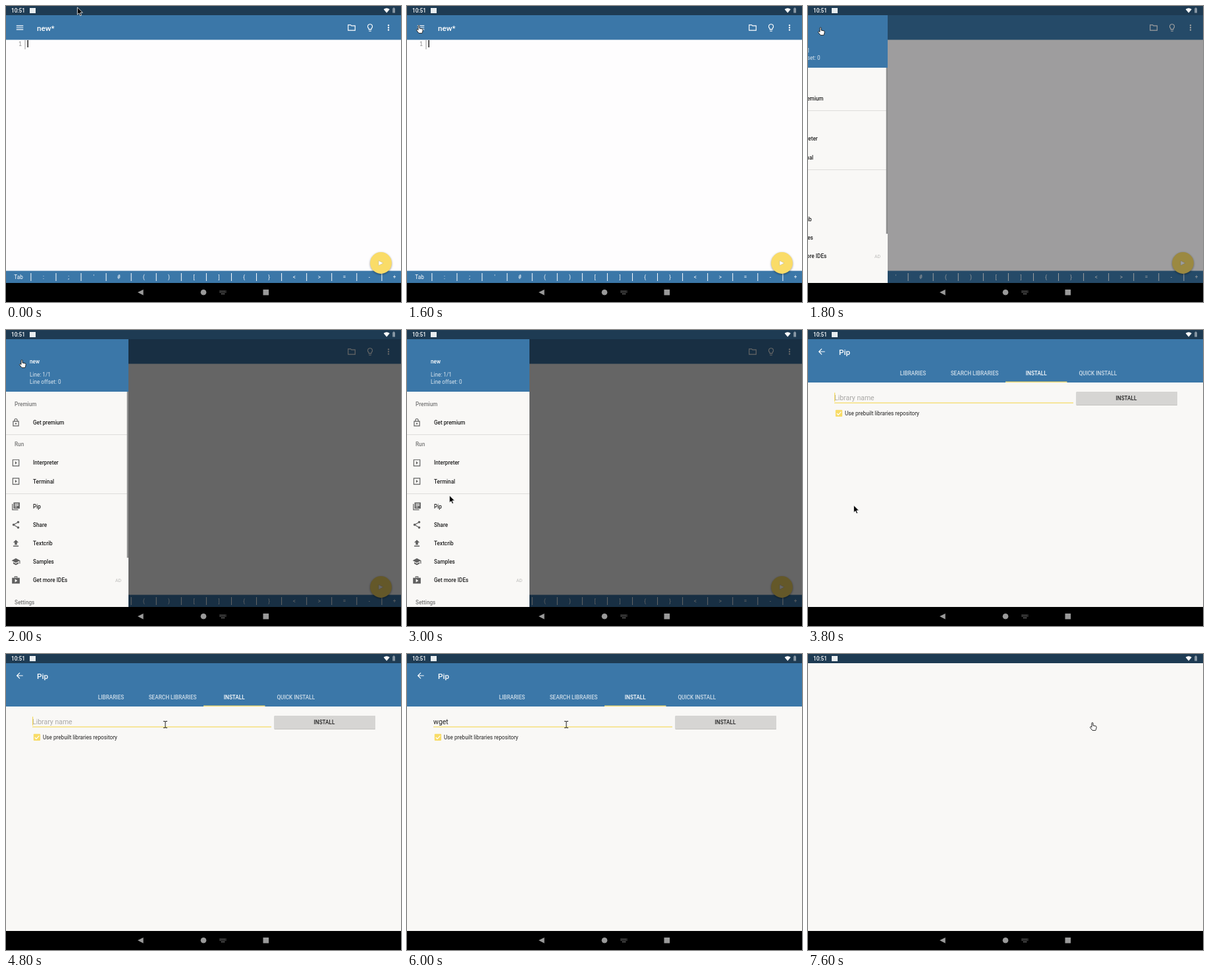
Animation, 600 px wide and 451 px high, one loop 8000 ms. Source, as an HTML page:

```html
<!DOCTYPE html>
<html lang="en">
<head>
<meta charset="utf-8">
<title>Installing a library</title>
<style>
  html, body { margin: 0; width: 100%; height: 100%; overflow: hidden; background: #f9f8f6; }
  svg.stage { display: block; width: 100vw; height: 100vh; }
  text { font: 400 8.2px Roboto, sans-serif; white-space: pre; }
  .medium { font-weight: 500; }
  .title { font-size: 11.7px; font-weight: 500; fill: #fff; }
  .field { font-size: 10.5px; }
  .middle { text-anchor: middle; }
  .line { fill: none; stroke: currentColor; stroke-width: 2; }
  .solid { fill: currentColor; }

  .anim { animation: 8s step-end infinite; }
  #editor { animation-name: editor; }
  #editorCaret { animation-name: editorCaret; }
  #scrim { animation-name: scrim; }
  #drawer { animation-name: drawer; }
  #press, #scrollbar { animation-name: press; }
  #scrollbar { animation-name: scrollbar; }
  #pip { animation-name: pip; }
  #hint { animation-name: hint; }
  #typed { animation-name: typed; }
  #fieldCaret { animation-name: fieldCaret; }
  #keyboard { animation-name: keyboard; }
  #pointer { animation-name: pointer; }
  #arrow { animation-name: arrow; }
  #hand { animation-name: hand; }
  #beam { animation-name: beam; }

  @keyframes editor { 0% { opacity: 1 } 47.5% { opacity: 0 } }
  @keyframes editorCaret {
    0% { opacity: 1 } 2.5% { opacity: 0 } 7.5% { opacity: 1 }
    15% { opacity: 0 } 20% { opacity: 1 } 27.5% { opacity: 0 }
  }
  @keyframes scrim { 0% { opacity: 0 } 22.5% { opacity: .38 } 25% { opacity: .6 } }
  @keyframes drawer {
    0% { transform: translateX(-187px) } 22.5% { transform: translateX(-65px) }
    25% { transform: none } 45% { transform: translateX(-31px) }
  }
  @keyframes press { 0% { opacity: 0 } 42.5% { opacity: 1 } }
  @keyframes scrollbar { 0% { opacity: 1 } 35% { opacity: 0 } }
  @keyframes pip { 0% { opacity: 0 } 47.5% { opacity: 1 } 90% { opacity: 0 } }
  @keyframes hint { 0% { opacity: 1 } 62.5% { opacity: 0 } }
  @keyframes typed {
    0% { clip-path: inset(0 100% 0 0) } 62.5% { clip-path: inset(0 65% 0 0) }
    65% { clip-path: inset(0 40% 0 0) } 67.5% { clip-path: none }
  }
  @keyframes fieldCaret {
    0% { transform: none; opacity: 1 }
    52.5% { transform: none; opacity: 0 }
    60% { transform: none; opacity: 1 }
    62.5% { transform: translateX(8px); opacity: 1 }
    65% { transform: translateX(14px); opacity: 1 }
    67.5% { transform: translateX(23px); opacity: 1 }
    72.5% { transform: translateX(23px); opacity: 0 }
    80% { transform: translateX(23px); opacity: 1 }
    85% { transform: translateX(23px); opacity: 0 }
  }
  @keyframes keyboard { 0% { opacity: 1 } 45% { opacity: 0 } 47.5% { opacity: 1 } }
  @keyframes pointer {
    0% { transform: translate(108px, 2px) }
    2.5% { transform: translate(104px, 4px) }
    5% { transform: translate(88px, 12px) }
    7.5% { transform: translate(66px, 21px) }
    10% { transform: translate(44px, 27px) }
    12.5% { transform: translate(24px, 29px) }
    15% { transform: translate(14px, 29px) }
    22.5% { transform: translate(15px, 32px) }
    25% { transform: translate(20px, 45px) }
    27.5% { transform: translate(25px, 72px) }
    30% { transform: translate(33px, 118px) }
    32.5% { transform: translate(43px, 170px) }
    35% { transform: translate(54px, 217px) }
    37.5% { transform: translate(64px, 252px) }
    40% { transform: translate(69px, 267px) }
    50% { transform: translate(84px, 247px) }
    52.5% { transform: translate(130px, 200px) }
    55% { transform: translate(190px, 145px) }
    57.5% { transform: translate(232px, 105px) }
    60% { transform: translate(239px, 102px) }
    77.5% { transform: translate(285px, 102px) }
    80% { transform: translate(355px, 102px) }
    82.5% { transform: translate(414px, 103px) }
    85% { transform: translate(428px, 104px) }
  }
  @keyframes arrow { 0% { opacity: 1 } 12.5% { opacity: 0 } 27.5% { opacity: 1 } 57.5% { opacity: 0 } }
  @keyframes hand { 0% { opacity: 0 } 12.5% { opacity: 1 } 27.5% { opacity: 0 } 82.5% { opacity: 1 } }
  @keyframes beam { 0% { opacity: 0 } 57.5% { opacity: 1 } 82.5% { opacity: 0 } }
</style>
</head>
<body>
<svg class="stage" viewBox="0 0 600 451" preserveAspectRatio="none">
  <defs>
    <g id="menu" class="line"><path d="M3 7h18M3 12h18M3 17h18"/></g>
    <g id="back" class="line"><path d="M20 12H5M12 4.5 4.5 12l7.5 7.5"/></g>
    <g id="folder" class="line"><path d="M3 5h6.5l2 2H21v12H3z"/></g>
    <g id="bulb" class="line"><path d="M9 17v-2.8a6 6 0 1 1 6 0V17zM9 21h6"/></g>
    <g id="more" class="solid"><circle cx="12" cy="6" r="2"/><circle cx="12" cy="12" r="2"/><circle cx="12" cy="18" r="2"/></g>
    <g id="lock"><path class="line" d="M5 9h14v12H5zM8.5 9V6a3.5 3.5 0 0 1 7 0v3"/><circle class="solid" cx="12" cy="15" r="2"/></g>
    <g id="run"><path class="line" d="M4 4h16v16H4z"/><path class="solid" d="M10 8v8l5-4z"/></g>
    <g id="books"><path class="line" d="M3 6v15h15"/><path class="solid" d="M6 2h16v16H6z"/><path d="M9 6h10M9 10h10M9 14h6" stroke="#f9f8f6" stroke-width="2"/></g>
    <g id="share"><path class="line" d="M18 5 6 12l12 7"/><g class="solid"><circle cx="18" cy="5" r="3"/><circle cx="6" cy="12" r="3"/><circle cx="18" cy="19" r="3"/></g></g>
    <g id="upload" class="solid"><path d="M5 18h14v2.5H5zM9 16h6v-6h4l-7-7-7 7h4z"/></g>
    <g id="school" class="solid"><path d="M12 3 1 9l11 6 9-5v7h2V9zM5 13.2v4l7 3.8 7-3.8v-4L12 17z"/></g>
    <g id="shop"><path class="line" d="M9 6V3h6v3"/><path class="solid" d="M2 6h20v15H2z"/><path fill="#f9f8f6" d="M9.5 9v9l6.5-4.5z"/></g>
  </defs>

  <rect width="600" height="451" fill="#f9f8f6"/>

  <g id="editor" class="anim">
    <rect y="14" width="600" height="408" fill="#fefdfe"/>
    <rect y="14" width="600" height="37.5" fill="#3b77a8"/>
    <text class="title" x="47" y="37.5">new*</text>
    <g id="toolbar" color="#fff"></g>
    <text x="24.5" y="61" text-anchor="end" fill="#888" style="font:9.4px 'Noto Sans Mono',monospace">1</text>
    <path d="M29 52v14" stroke="#999"/>
    <rect id="editorCaret" class="anim" x="32.5" y="52" width="1.3" height="11"/>
    <rect y="403.5" width="600" height="18.5" fill="#3b77a8"/>
    <g id="keys" fill="#fff"></g>
    <circle cx="569.5" cy="391.5" r="16.4" fill="#fadc68" style="filter:drop-shadow(0 1.5px 1.8px #0006)"/>
    <path d="M566 388v7.4l7-3.7z" fill="#fff" stroke="#b9b08a" stroke-width=".5"/>
    <rect id="scrim" class="anim" y="14" width="600" height="408"/>

    <g id="drawer" class="anim">
      <rect y="14" width="186" height="408" fill="#f9f8f6"/>
      <rect y="14" width="186" height="80" fill="#3b77a8"/>
      <text class="medium" x="36" y="50.5" fill="#fff">new</text>
      <g fill="#d9e5ee"><text x="36" y="71">Line: 1/1</text><text x="36" y="82">Line offset: 0</text></g>
      <path d="M0 159.5h186M0 249.5h186" stroke="#dddcda"/>
      <rect id="press" class="anim" x="5" y="254.5" width="176" height="28" rx="2" fill="#d2d1ce"/>
      <g class="medium" id="items" color="#606060" fill="#222"></g>
      <g id="sections" fill="#777"></g>
      <text x="166" y="383.7" fill="#bdbcba" style="font-size:7px">AD</text>
      <rect id="scrollbar" class="anim" x="183.7" y="94" width="2.3" height="253" fill="#8c8c8c"/>
    </g>
  </g>

  <g id="pip" class="anim">
    <rect y="14" width="600" height="408" fill="#f9f8f6"/>
    <rect y="14" width="600" height="66" fill="#3b77a8"/>
    <g id="pipBack" color="#fff"></g>
    <text class="title" x="47" y="37.5">Pip</text>
    <g id="tabs" fill="#fff"></g>
    <rect x="300" y="78.5" width="93.5" height="1.5" fill="#f6e07c"/>
    <text id="hint" class="field anim" x="40" y="107" fill="#a9a8a6">Library name</text>
    <text id="typed" class="field anim" x="40" y="107" fill="#222">wget</text>
    <rect id="fieldCaret" class="anim" x="40" y="95.5" width="1.2" height="13.5" fill="#f5d95c"/>
    <rect x="40" y="110.4" width="363" height="1.3" fill="#f6dd6a"/>
    <rect x="407.5" y="94.5" width="153.5" height="20.5" rx="1" fill="#bebdbb"/>
    <rect x="407.5" y="94" width="153.5" height="20.3" rx="1" fill="#d6d5d3"/>
    <text class="medium middle" x="483.5" y="107" fill="#222">INSTALL</text>
    <rect x="41.8" y="121.8" width="10.3" height="10.3" rx="1" fill="#f8dc68"/>
    <path d="m43.8 127 2.2 2.3 4.4-4.6" fill="none" stroke="#fff" stroke-width="1.2"/>
    <text x="56" y="130" fill="#222">Use prebuilt libraries repository</text>
  </g>

  <rect width="600" height="14" fill="#1e3b53"/>
  <text class="medium" x="8" y="10" fill="#fff">10:51</text>
  <rect x="36" y="3" width="9" height="8" fill="#e8edf0"/>
  <path d="M578.2 10.5 573.6 5q4.6-3.6 9.2 0z" fill="#fff"/>
  <path d="M587.2 3.4h1V2.6h1.8v.8h1v7.2h-3.8z" fill="#8797a4"/>

  <rect y="422" width="600" height="29"/>
  <g fill="#9a9a9a">
    <path d="M200 436.3l8.6-4.4v8.8z"/>
    <circle cx="300" cy="436.3" r="4.3"/>
    <rect x="390.5" y="432" width="8.6" height="8.6"/>
    <path id="keyboard" class="anim" d="M324.5 434.3h10M324.5 436.3h10M327 438.6h5" stroke="#9a9a9a" stroke-width="1.1" stroke-dasharray="1.2 .7"/>
  </g>

  <g id="pointer" class="anim">
    <path id="arrow" class="anim" d="M.4 0v11.2L3 8.8l1.7 4 1.9-.8-1.7-3.9h3.6z" stroke="#fff" stroke-width=".8"/>
    <path id="hand" class="anim" d="M3 7.6V1.6a1 1 0 0 1 2 0V5l4 .8q1.4.4 1.2 1.8l-.6 2.9-.8 1.9H4L1 8.7Q0 7 1.2 6.6 2 6.5 3 7.6z" fill="#fff" stroke="#111" stroke-width=".9"/>
    <path id="beam" class="anim" d="M0 .5h2q1 0 1 1v8q0 1-1 1H0M6 .5H4q-1 0-1 1m0 8q0 1 1 1h2" fill="none" stroke="#222"/>
  </g>
</svg>
<script>
  const add = (id, markup) => document.getElementById(id).insertAdjacentHTML('beforeend', markup);
  // Icons are drawn on a 24-unit grid and centred on (x, y).
  const icon = (name, x, y) =>
    `<use href="#${name}" transform="translate(${x} ${y}) scale(.586) translate(-12 -12)"/>`;
  const label = (text, x, y, attrs = '') => `<text x="${x}" y="${y}" ${attrs}>${text}</text>`;

  add('toolbar', icon('menu', 21, 33) + icon('folder', 525, 33) + icon('bulb', 553, 33) + icon('more', 581, 33));
  add('pipBack', icon('back', 21, 33));

  ['Tab', ':', ';', "'", '#', '(', ')', '[', ']', '{', '}', '&lt;', '&gt;', '=', '-', '+'].forEach((key, i) => {
    const x = 19 + i * 38.07;
    add('keys', label(key, x, 415.6, 'class="middle"') +
      `<rect x="${x + 18.4}" y="407" width="1" height="12"/>`);
  });

  [['lock', 'Get premium', 140.8], ['run', 'Interpreter', 202.4], ['run', 'Terminal', 230.5],
   ['books', 'Pip', 268.6], ['share', 'Share', 296.8], ['upload', 'Textcrib', 324.9],
   ['school', 'Samples', 353], ['shop', 'Get more IDEs', 381.1]].forEach(([name, text, y]) =>
    add('items', icon(name, 15, y) + label(text, 41, y + 3, 'class="medium"')));

  [['Premium', 115.6], ['Run', 177.2], ['Settings', 417.6]].forEach(([text, y]) =>
    add('sections', label(text, 13, y, 'class="medium"')));

  ['LIBRARIES', 'SEARCH LIBRARIES', 'INSTALL', 'QUICK INSTALL'].forEach((text, i) =>
    add('tabs', label(text, 159.5 + i * 93.6, 69, `class="medium middle" opacity="${i === 2 ? 1 : .75}"`)));
</script>
</body>
</html>
```
